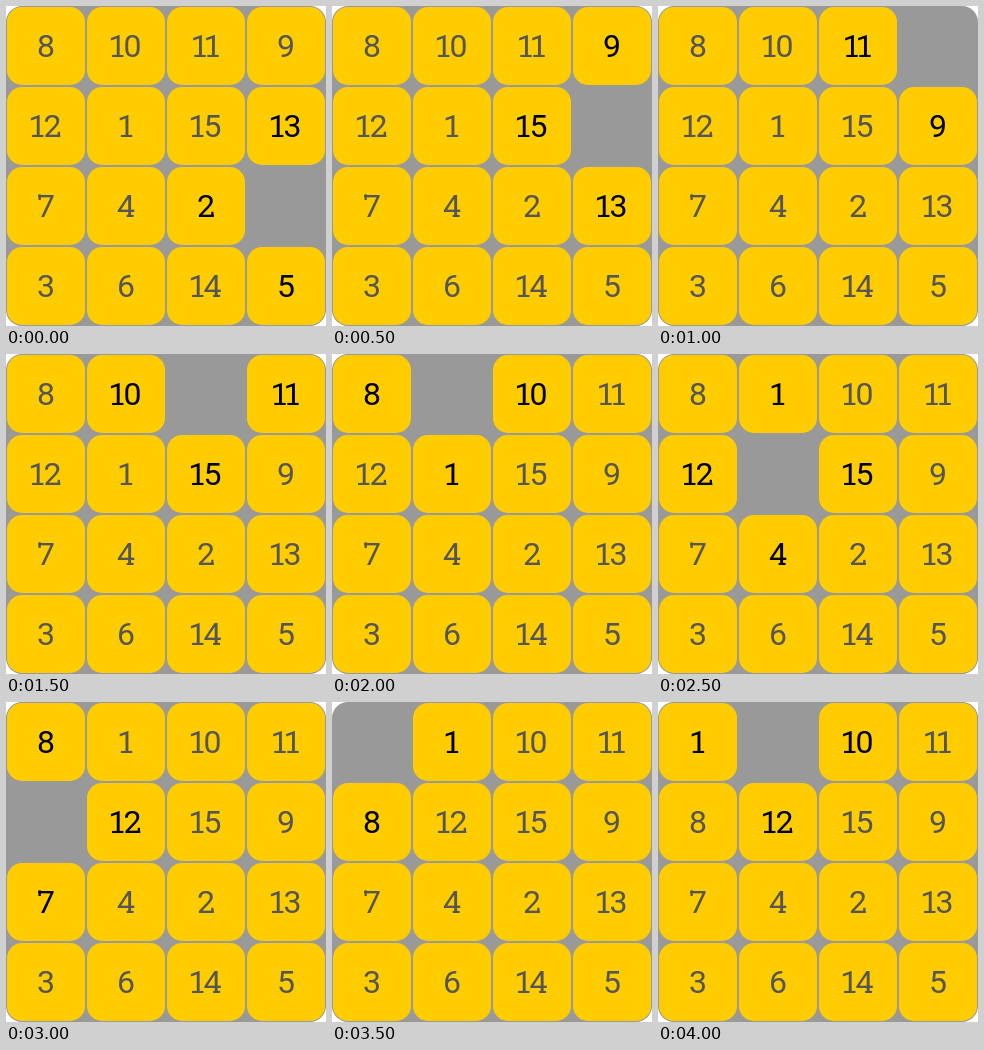
Write an HTML page that moves like this. It is 320 px wide and 320 px high and loops after 4.5 s.

```html
<!DOCTYPE html>
<html lang="en">
<head>
<meta charset="utf-8">
<title>Fifteen puzzle</title>
<style>
html, body { margin: 0; width: 100%; height: 100%; overflow: hidden; background: #fff; }
svg { display: block; width: 100%; height: 100%; }
text { font: 32px Roboto, sans-serif; text-anchor: middle; }
</style>
</head>
<body>
<svg id="board" viewBox="0 0 320 320">
  <rect width="320" height="320" rx="16" fill="#999"/>
</svg>
<script>
const NS = 'http://www.w3.org/2000/svg';
const STEP = 500, SIZE = 80, BASE = 51;
const board = document.getElementById('board');

const start = [8, 10, 11, 9, 12, 1, 15, 13, 7, 4, 2, 0, 3, 6, 14, 5];
const gaps = [11, 7, 3, 2, 1, 5, 4, 0, 1];

// Slab serifs, relative to a digit's centre and baseline
const serifs = {
  1: 'M-5.2 -2.1H6.2V0H-5.2Z',
  2: 'M5.2 -5.2H7.5V0H5.2Z',
  4: 'M.6 -2.1H7.6V0H.6Z',
  7: 'M-7.5 -22.7H-5.2V-17H-7.5Z'
};

function add(parent, tag, attrs) {
  const el = document.createElementNS(NS, tag);
  for (const key in attrs) el.setAttribute(key, attrs[key]);
  return parent.appendChild(el);
}

const advance = digit => digit === '1' ? 13 : 17.5;

function makeTile(n) {
  const tile = add(board, 'g', {});
  add(tile, 'rect', { x: 1, y: 1, width: 78, height: 78, rx: 15, fill: '#fc0' });
  const digits = [...String(n)];
  let x = SIZE / 2 - digits.reduce((sum, d) => sum + advance(d), 0) / 2;
  const centres = digits.map(d => {
    const centre = x + advance(d) / 2;
    x += advance(d);
    return centre;
  });
  const label = add(tile, 'g', {});
  add(label, 'text', { x: centres.join(' '), y: BASE }).textContent = n;
  digits.forEach((d, i) => {
    if (serifs[d]) add(label, 'path', { d: serifs[d], transform: `translate(${centres[i]} ${BASE})` });
  });
  return { tile, label };
}

const tiles = {};
for (let n = 1; n <= 15; n++) tiles[n] = makeTile(n);

// Each step slides one tile into the gap
const states = [start];
for (let i = 1; i < gaps.length; i++) {
  const next = states[i - 1].slice();
  next[gaps[i - 1]] = next[gaps[i]];
  next[gaps[i]] = 0;
  states.push(next);
}

const col = cell => cell % 4;
const row = cell => Math.floor(cell / 4);
const touching = (a, b) => Math.abs(col(a) - col(b)) + Math.abs(row(a) - row(b)) === 1;

let shown = -1;
function draw(time) {
  const step = Math.floor(time / STEP) % gaps.length;
  if (step === shown) return;
  shown = step;
  states[step].forEach((n, cell) => {
    if (!n) return;
    const { tile, label } = tiles[n];
    tile.setAttribute('transform', `translate(${col(cell) * SIZE} ${row(cell) * SIZE})`);
    label.setAttribute('fill', touching(cell, gaps[step]) ? '#000' : '#555');
  });
}

const origin = performance.now();
function loop() {
  draw(performance.now() - origin);
  requestAnimationFrame(loop);
}
loop();
</script>
</body>
</html>
```
